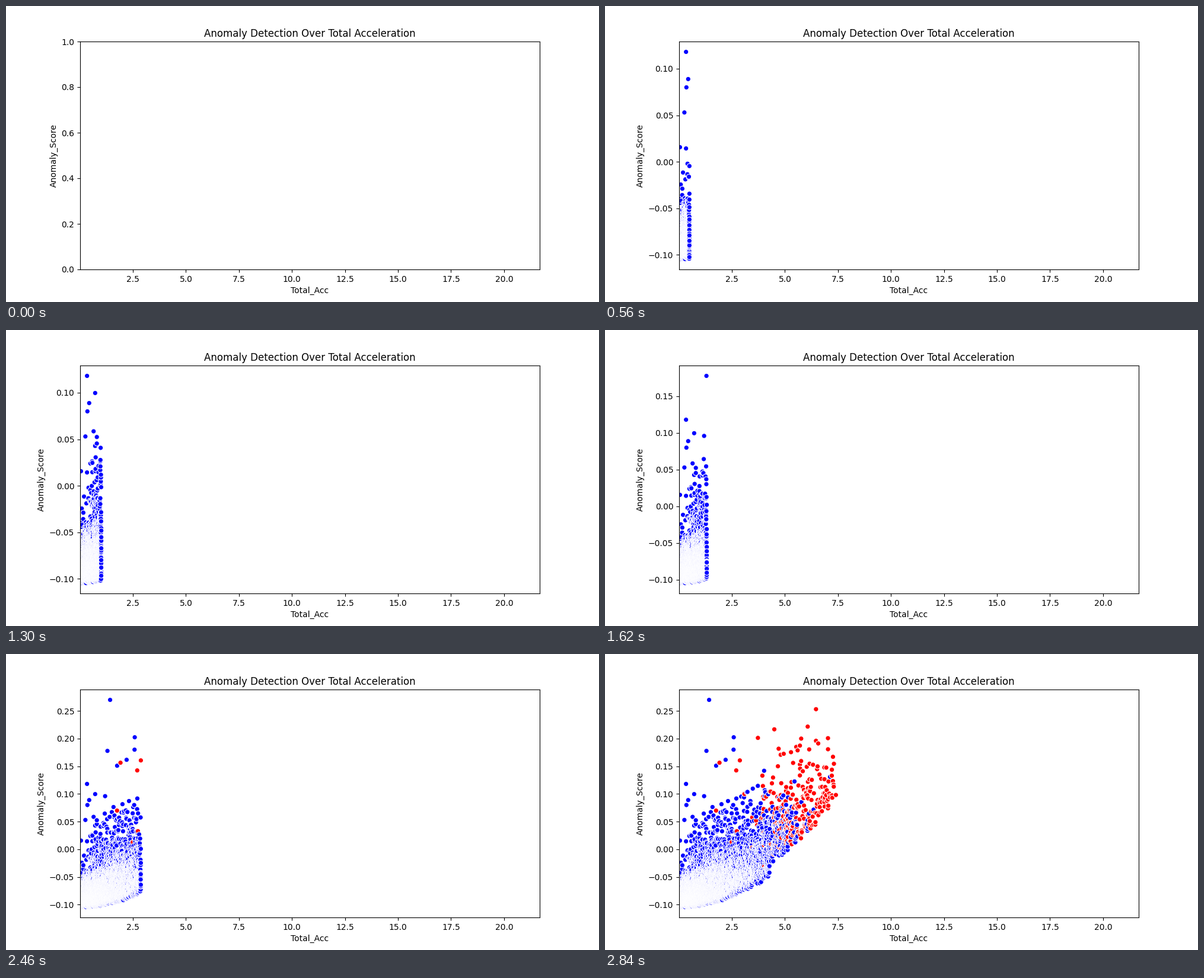
Animation, 1000 px wide and 500 px high, one loop 2.86 s. Source, as a matplotlib script:

```python
import numpy as np
import matplotlib.pyplot as plt
from matplotlib.animation import FuncAnimation

FRAMES, INTERVAL = 143, 20
BATCH = 70
rng = np.random.default_rng(7)

# Isolated extremes: acceleration, score
NORMAL = [(.25, -.1045), (.26, .053), (.338, .1181), (.439, .0889),
          (.355, .08), (.721, .0997), (1.19, .096), (1.30, .1778),
          (1.426, .27), (1.756, .151), (2.587, .2024), (2.578, .18),
          (2.204, .1617)]
ANOMALY = [(1.915, .1564), (2.875, .1606), (2.704, .1425), (3.727, .2013),
           (4.5, .2168), (6.074, .2217), (6.466, .2532), (7.03, .2008)]


def reach(step):
    """Largest acceleration shown at a step: the quantile of the data."""
    e = -np.log(1 - step / FRAMES)
    return .012 + .21 * (1 - np.exp(-e / .06)) + 1.28 * e + .035 * e ** 2


def make_scores(x):
    n = len(x)
    low = -.105 + .003 * x ** 2 + .022 * (x > 4.3)
    width = np.minimum(.017 + .006 * x, .045)
    core = width * rng.gamma(2, .5, n)
    tail = 1.5 * width - .045 * np.log(1 - .95 * rng.random(n))
    in_tail = rng.random(n) < np.minimum(.01 + .05 * x ** 2, .15)
    return np.minimum(low + np.where(in_tail, tail, core), .2)


def make_flags(x, score):
    odds = np.exp(35 * (score - .06) + 1.6 * (x - 4.7))
    return rng.random(len(x)) < .95 * odds / (1 + odds)


def make_data():
    x = reach(rng.uniform(0, FRAMES - 1, BATCH * (FRAMES - 1)))
    score = make_scores(x)
    points = np.vstack([np.column_stack([x, score]), NORMAL, ANOMALY])
    flags = np.concatenate([make_flags(x, score), [False] * len(NORMAL),
                            [True] * len(ANOMALY)])
    order = np.argsort(points[:, 0])
    colors = np.where(flags[:, None], (1., 0, 0, 1), (0, 0, 1., 1))
    return points[order], colors[order]


points, colors = make_data()

fig, ax = plt.subplots(figsize=(10, 5), dpi=100)
ax.set_title("Anomaly Detection Over Total Acceleration")
ax.set_xlabel("Total_Acc")
ax.set_ylabel("Anomaly_Score")
ax.set_xlim(.012, 21.68)
dots = ax.scatter([], [], s=36, edgecolors="w", linewidths=.8)


def update(i):
    n = np.searchsorted(points[:, 0], reach(i))
    dots.set_offsets(points[:n])
    dots.set_facecolor(colors[:n])
    if n:
        low, high = points[:n, 1].min(), points[:n, 1].max()
        pad = .05 * (high - low)
        ax.set_ylim(low - pad, high + pad)
    else:
        ax.set_ylim(0, 1)
    return dots,


anim = FuncAnimation(fig, update, frames=FRAMES, interval=INTERVAL,
                     init_func=lambda: update(0), repeat=True)
plt.show()
```
